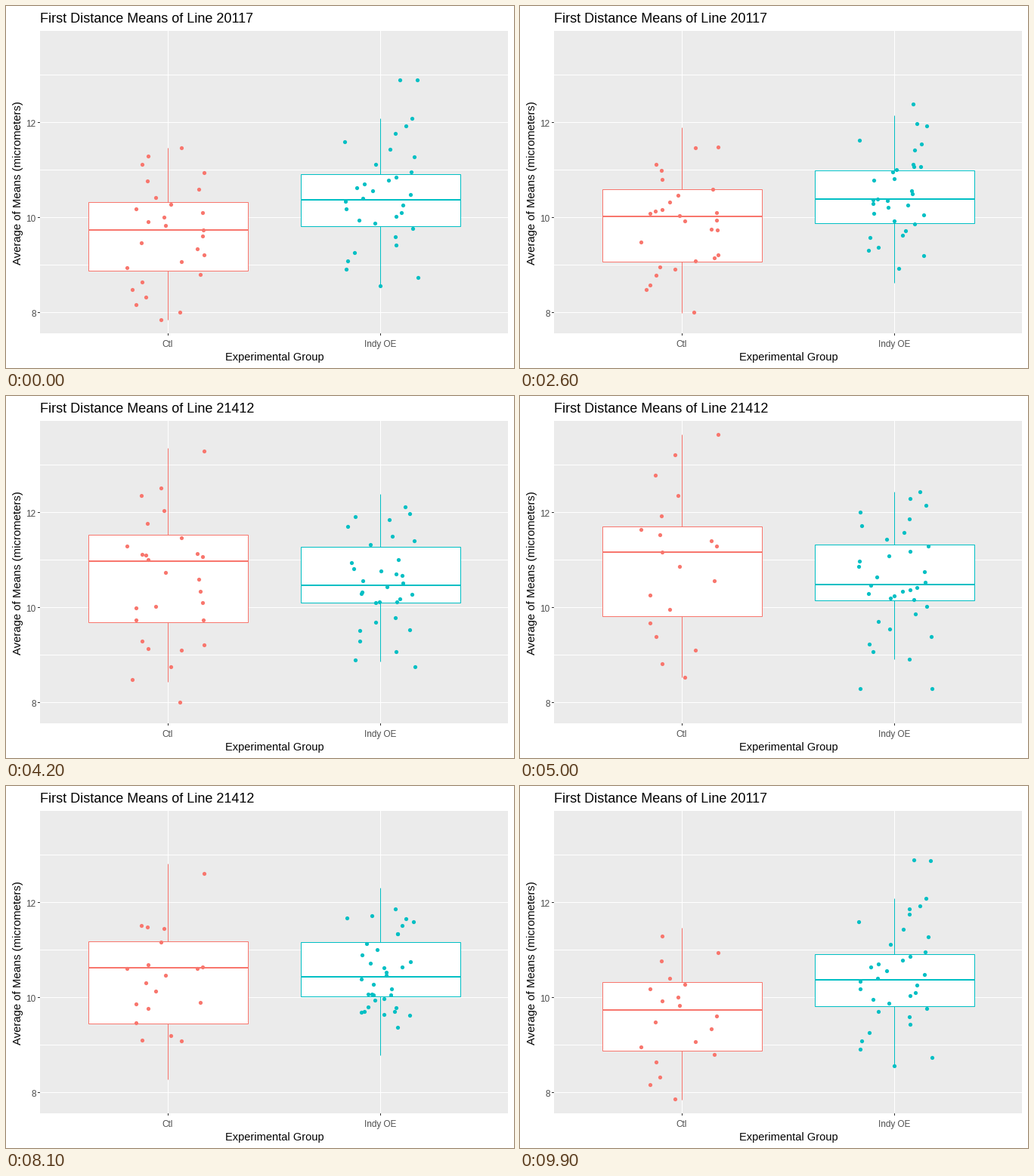
A matplotlib script that plays this animation: 672x480 px, repeating every 10 s.

```python
import numpy as np
import matplotlib.pyplot as plt
from matplotlib.animation import FuncAnimation
from matplotlib.patches import Rectangle

W, H, DPI = 672, 480, 100
PT = 72 / DPI  # points per pixel
FRAMES, STEP = 100, 100
RED, TEAL, LABEL, TICK = "#F8766D", "#00BFC4", "#4D4D4D", "#333333"
LEFT, RIGHT, TOP, BOTTOM = 44.5, 663.5, 32.5, 433.5
CTL_X, INDY_X = 214, 495
UNIT = 63  # pixels per micrometer

# Upper whisker, upper hinge, median, lower hinge, lower whisker
CTL_FIRST = (188, 260, 297, 351, 416)
CTL_SECOND = (51, 173, 207, 292, 373)
INDY_FIRST = (149, 223, 257, 292, 371)
INDY_SECOND = (127, 197, 250, 271, 349)

plt.rcParams.update({"font.family": "Liberation Sans", "path.snap": False})
rng = np.random.default_rng(12)

# Whole numbers fall on pixel centres
fig = plt.figure(figsize=(W / DPI, H / DPI), dpi=DPI, facecolor="white")
ax = fig.add_axes([0, 0, 1, 1])
ax.set_xlim(-0.5, W - 0.5)
ax.set_ylim(H - 0.5, -0.5)
ax.axis("off")


def line(xs, ys, color, width=1, z=2):
    return ax.plot(xs, ys, color=color, lw=width * PT, zorder=z,
                   solid_capstyle="butt")[0]


def label(x, y, s, px, color="black", ha="center", **kw):
    return ax.text(x, y, s, fontsize=px * PT, color=color, ha=ha,
                   va="baseline", **kw)


def spread(summary, n):
    """n heights that follow a five-number summary, in random order."""
    ys = np.interp(np.linspace(0, 4, n), range(5), summary)
    return rng.permutation(ys)


def jitter(cx, n):
    return cx + rng.uniform(-54, 54, n)


class Box:
    """Box plot tweened between two five-number summaries."""

    def __init__(self, cx, color, first, second):
        self.cx = cx
        self.ends = np.array([first, second], float)
        x0, x1 = cx - 105, cx + 106
        self.whiskers = [line([], [], color, z=3) for _ in range(2)]
        self.body = ax.add_patch(Rectangle(
            (x0, 0), x1 - x0, 1, fc="white", ec=color, lw=PT, zorder=4,
            joinstyle="miter"))
        self.median = line([x0 - 0.5, x1 + 0.5], [0, 0], color, 2, 5)

    def update(self, w):
        a, b = self.ends
        top, q3, mid, q1, low = np.round(a + (b - a) * w)
        self.whiskers[0].set_data([self.cx] * 2, [top, q3])
        self.whiskers[1].set_data([self.cx] * 2, [q1, low])
        self.body.set_y(q3)
        self.body.set_height(q1 - q3)
        self.median.set_ydata([mid - 0.5] * 2)


# Control dots keep their x; the last ones stay put, then vanish
CTL_ALL, CTL_KEPT = 27, 19
ctl_a = np.column_stack([jitter(CTL_X, CTL_ALL), spread(CTL_FIRST, CTL_ALL)])
ctl_b = ctl_a.copy()
ctl_b[:CTL_KEPT, 1] = spread(CTL_SECOND, CTL_KEPT)

# Overexpression dots also trade x; the last two exist only in the second line
INDY_ALL, INDY_KEPT = 34, 32
xs = jitter(INDY_X, INDY_ALL)
indy_b = np.column_stack(
    [np.roll(xs, 8), np.r_[spread(INDY_SECOND, INDY_ALL - 2), 388, 388]])
indy_b[:, 1] = rng.permutation(indy_b[:, 1])
indy_a = indy_b.copy()
indy_a[:INDY_KEPT] = np.column_stack(
    [xs[:INDY_KEPT], np.r_[98, 98, spread(INDY_FIRST, INDY_KEPT - 2)]])

# Panel, grid and axes
ax.add_patch(Rectangle((LEFT, TOP), RIGHT - LEFT, BOTTOM - TOP,
                       fc="#EBEBEB", lw=0, zorder=1))
for value in range(8, 14):
    y = 280 - (value - 10) * UNIT
    line([LEFT, RIGHT], [y, y], "white")
    if value % 2 == 0:
        line([LEFT - 3, LEFT], [y, y], TICK)
        label(39, y + 5, str(value), 11.73, LABEL, "right")
for x, s in ((CTL_X, "Ctl"), (INDY_X, "Indy OE")):
    line([x, x], [TOP, BOTTOM], "white")
    line([x, x], [BOTTOM, BOTTOM + 3], TICK)
    label(x - 0.5, 451.5, s, 11.73, LABEL)
label(354.5, 469.5, "Experimental Group", 14.6)
label(19.5, 234, "Average of Means (micrometers)", 14.85, rotation=90,
      rotation_mode="anchor")
title = label(LEFT, 22, "", 18, ha="left")

boxes = [Box(CTL_X, RED, CTL_FIRST, CTL_SECOND),
         Box(INDY_X, TEAL, INDY_FIRST, INDY_SECOND)]
dots = ax.scatter([], [], s=(5.2 * PT) ** 2, linewidths=0, zorder=6)


def weight(i):
    """Share of the second line: hold, sine ease in, hold, sine ease out."""
    p = np.interp(i, [16, 50, 67, 100], [0, 1, 1, 0])
    return (1 - np.cos(np.pi * p)) / 2


def update(i):
    w = weight(i)
    title.set_text("First Distance Means of Line "
                   + ("21412" if w > 0.49 else "20117"))
    for box in boxes:
        box.update(w)

    # Unmatched dots come and go only when a transition ends
    second = i >= 50
    n_ctl = CTL_KEPT if second else CTL_ALL
    n_indy = INDY_ALL if second else INDY_KEPT
    ctl = (ctl_a + (ctl_b - ctl_a) * w)[:n_ctl]
    indy = (indy_a + (indy_b - indy_a) * w)[:n_indy]
    dots.set_offsets(np.round(np.vstack([ctl, indy])))
    dots.set_facecolor([RED] * n_ctl + [TEAL] * n_indy)
    return []


anim = FuncAnimation(fig, update, frames=FRAMES, interval=STEP,
                     init_func=lambda: update(0), repeat=True,
                     repeat_delay=0, blit=False)
plt.show()
```
